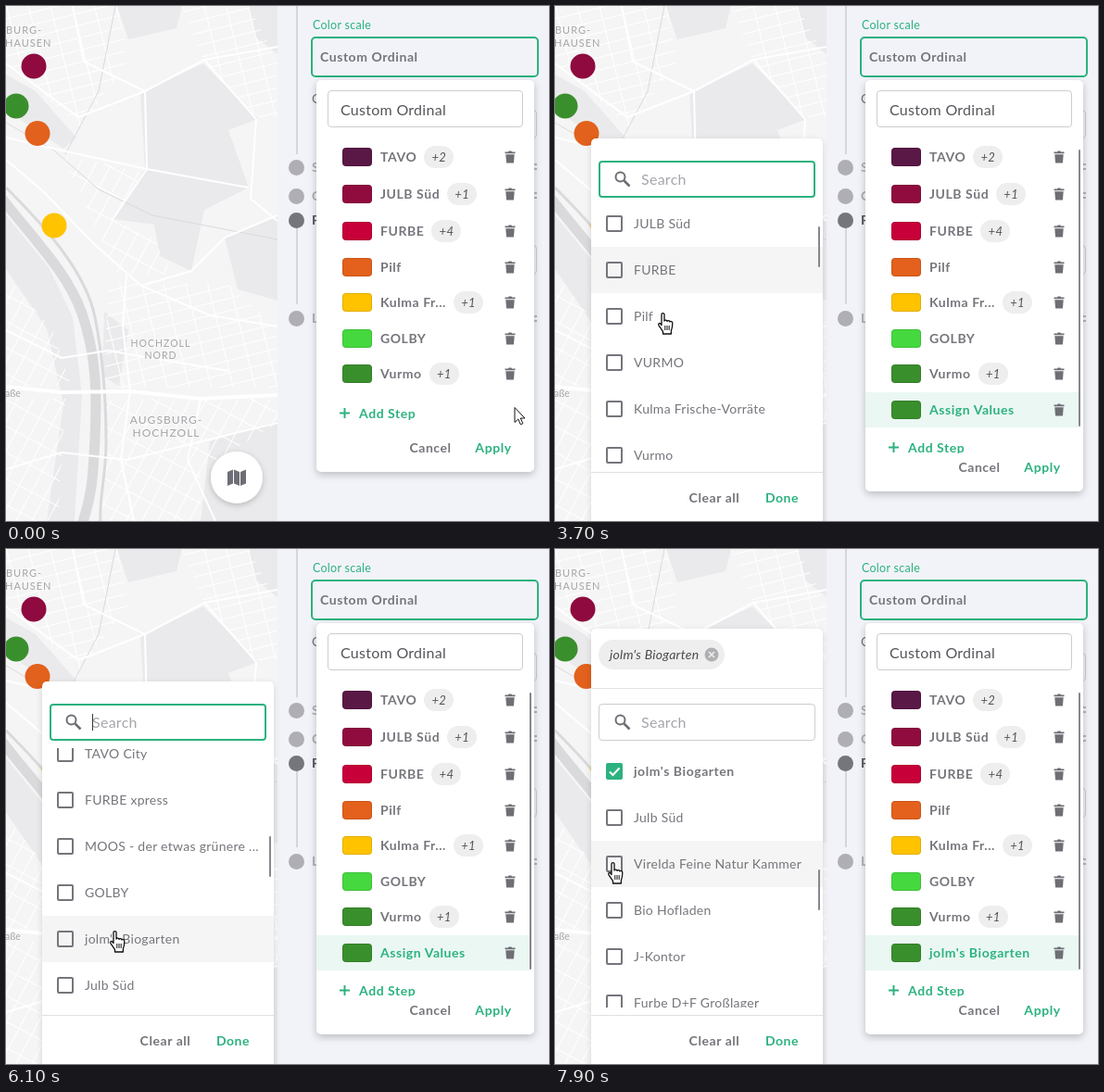
An HTML page that plays this animation: 586x556 px, repeating every 8000 ms.

```html
<!DOCTYPE html>
<html lang="en">
<head>
<meta charset="utf-8">
<title>Custom color scale</title>
<style>
  html, body { margin: 0; width: 100%; height: 100%; overflow: hidden; }
  body { --green: #2cb27f; --gray: #75757c; background: #f2f3f9; color: var(--gray);
    font: 14px/20px Lato, "Open Sans", sans-serif; letter-spacing: .02em; }
  #stage { position: relative; width: 586px; height: 556px; overflow: hidden; }
  #stage div, #stage svg { position: absolute; box-sizing: border-box; white-space: nowrap; }
  b { font-weight: 700; letter-spacing: .04em; }
  .green { color: var(--green); }
  .mid { transform: translate(-50%, -50%); }
  .side { left: 330px; font-weight: 700; margin-top: -10px; color: #aeaeb4; }

  #card { left: 335px; top: 80px; width: 235px; height: 423px; background: #fff;
    border-radius: 5px; box-shadow: 0 3px 9px #0000003a; }
  #card.added { height: 444px; }
  #name { left: 12px; top: 11px; width: 211px; height: 40px; padding-left: 13px;
    border: 1px solid #cdcdd1; border-radius: 4px; font-size: 16px; line-height: 39px; color: #55555b; }
  #steps { left: 0; top: 55px; width: 235px; height: 348px; overflow: hidden; }
  .step { left: 0; width: 230px; height: 38px; display: flex; align-items: center; padding-left: 69px; }
  .swatch { left: 28px; top: 9px; width: 32px; height: 20px; border-radius: 4px; border: 1px solid #0000001c; }
  .count { margin-left: 8px; width: 32px; height: 24px; border-radius: 12px; background: #eee;
    text-align: center; font: italic 13px/24px Lato, "Open Sans", sans-serif; color: #55555b; }
  .trash { left: 203px; top: 12px; fill: #6e6e75; }
  .grip { left: 9px; top: 12px; fill: #75757c; }
  #add { left: 16px; top: 291px; width: 102px; height: 28px; overflow: hidden; border-radius: 4px; }
  .added #add { top: 328px; }
  #add b { position: absolute; left: 30px; top: 4px; }
  #thumb { left: 230px; top: 75px; width: 2px; height: 299px; background: #86868d; border-radius: 1px; }
  .act { top: 397px; }
  .added .act { top: 418px; }
  .ripple { border-radius: 50%; }

  #menu { left: 39px; top: 143px; width: 250px; height: 440px; background: #fff; border-radius: 5px;
    box-shadow: 0 2px 7px #00000024; }
  #menu.picked { top: 86px; height: 497px; }
  #body { left: 0; top: 0; width: 250px; height: 413px; }
  .picked #body { top: 57px; }
  #chip { left: 8px; top: 12px; height: 32px; padding: 0 28px 0 12px; border-radius: 16px;
    background: #eee; font-style: italic; line-height: 32px; color: #4a4a50; }
  #chip svg { right: 6px; top: 8px; }
  #search { left: 8px; top: 24px; width: 234px; height: 40px; border: 2px solid var(--green); border-radius: 4px; }
  .picked #search { border: 1px solid #cdcdd1; }
  #hint { left: 54px; top: 34px; font-size: 16px; color: #a5a5aa; }
  #caret { left: 54px; top: 35px; width: 1px; height: 18px; background: #333; }
  #list { left: 0; top: 72px; width: 250px; height: 280px; overflow: hidden; }
  .item { left: 0; width: 250px; height: 50px; padding-left: 46px; line-height: 50px; overflow: hidden; }
  .item.over { background: #f5f5f5; }
  .box { left: 16px; top: 16px; width: 18px; height: 18px; border: 2px solid var(--gray); border-radius: 2px; }
  .box svg { display: none; left: -2px; top: -2px; }
  .item.on { font-weight: 700; letter-spacing: .04em; }
  .on .box { background: var(--green); border-color: var(--green); }
  .on .box svg { display: block; }
  #bar { left: 245px; width: 2px; height: 44px; background: #86868d; border-radius: 1px; }
</style>
</head>
<body>
<div id="stage">
  <svg width="586" height="556" viewBox="0 0 586 556">
    <defs>
      <pattern id="gridA" width="23" height="13" patternUnits="userSpaceOnUse" patternTransform="rotate(-14)">
        <path d="M0 .5H23M.5 0V13" stroke="#fff" fill="none"/>
      </pattern>
      <pattern id="gridB" width="15" height="25" patternUnits="userSpaceOnUse" patternTransform="rotate(28)">
        <path d="M0 .5H15M.5 0V25" stroke="#fff" fill="none"/>
      </pattern>
      <filter id="soft" x="-30%" y="-30%" width="160%" height="160%">
        <feDropShadow dx="0" dy="2" stdDeviation="3" flood-opacity=".22"/>
      </filter>
    </defs>
    <path fill="#f5f5f6" d="M0 0H293V556H0Z"/>
    <g fill="#eaeaec">
      <path d="M145 94 213 62 272 122 240 134 262 196 214 220 200 286 166 270 160 236 116 230 150 176Z"/>
      <path d="M0 74 32 92 76 142 62 154 0 112ZM120 0H190L184 24 132 36ZM262 0H293V52L270 34Z"/>
      <path d="M0 226 46 282 72 336 82 420 74 556H44L62 430 44 348 0 284ZM106 330 132 350 122 410 104 400Z"/>
      <path d="M236 250 293 226V318L250 306ZM220 470 293 448V556H210Z"/>
    </g>
    <path fill="url(#gridA)" d="M0 0H120L132 60 80 130 0 60ZM110 300 240 300 293 350V412H106ZM190 0H262L293 60V120H268L214 60Z"/>
    <path fill="url(#gridB)" d="M0 290 50 350 70 410H0ZM0 424H64L56 556H0ZM106 424H293V450L210 500V556H104ZM60 160 150 180 116 230 160 250 180 290H120Z"/>
    <g fill="none" stroke="#dadadc">
      <path stroke-width="11" d="M-4 208C26 248 66 286 82 332S98 420 96 466 92 530 82 560"/>
      <path stroke-width="3" d="M0 196C40 236 86 286 96 336S108 430 108 470 100 530 102 560"/>
      <path d="M0 126 52 156 100 198 158 226 293 252M118 0 100 92 64 160"/>
    </g>
    <g fill="none" stroke="#fff" stroke-width="2">
      <path d="M0 166 40 200 94 256 146 302 220 334 293 346M0 62 78 120 150 92 214 58 293 44M214 58 270 122 264 208 293 232"/>
      <path d="M72 0 84 60 150 92 152 176 114 232M0 142 60 156 152 176 262 196M130 290 126 346 134 416 124 490 138 556"/>
      <path stroke-width="4" d="M0 411 60 417 134 416 210 424 293 420"/>
      <path d="M210 424 196 490 226 556M146 302 200 286 236 250 293 226M0 350 60 380 110 372 240 394M0 500 60 482 130 490 293 450"/>
    </g>
    <g font-family="Lato, 'Open Sans', sans-serif" font-size="11" fill="#a4a4a8" letter-spacing="1"
       stroke="#f8f8f8" stroke-width="2" paint-order="stroke">
      <text x="0" y="30">BURG-</text><text x="-1" y="44">HAUSEN</text>
      <g text-anchor="middle">
        <text x="167" y="368" font-size="10.5">HOCHZOLL</text><text x="167" y="381" font-size="10.5">NORD</text>
        <text x="173" y="451" font-size="12">AUGSBURG-</text><text x="173" y="465" font-size="12">HOCHZOLL</text>
      </g>
      <text x="-1" y="422" font-size="10.5" letter-spacing="0">aße</text>
    </g>
    <circle cx="30" cy="65" r="13.5" fill="#8e0a3f"/>
    <circle cx="11" cy="108" r="13.5" fill="#3a8f2d"/>
    <circle cx="34" cy="137.500" r="13.5" fill="#e2611d"/>
    <circle cx="52" cy="237" r="13.5" fill="#ffc300"/>
    <circle cx="249" cy="509" r="28" fill="#fff" filter="url(#soft)"/>
    <path fill="#6e6e76" d="M239 503 245 500.500V515.500L239 518ZM246 500.500 252 503V518L246 515.500ZM253 503 259 500.500V515.500L253 518Z"/>

    <path stroke="#d5d5dc" stroke-width="2" d="M314 0V160M314 236V322"/>
    <g fill="#aeaeb4">
      <circle cx="313.500" cy="174.500" r="8.500"/><circle cx="313.500" cy="205.500" r="8.500"/>
      <circle cx="313.500" cy="231.500" r="8.500" fill="#75757c"/><circle cx="313.500" cy="337.500" r="8.500"/>
    </g>
    <path stroke="#b4b4ba" stroke-width="2" stroke-dasharray="3 1" d="M566 171H574M566 176H574M566 202H574M566 207H574M566 335H574M566 340H574"/>
    <path fill="none" stroke="#cdcdd3" d="M560 112.500H569Q572.500 112.500 572.500 116V138Q572.500 142.500 569 142.500H560M560 258.500H569Q572.500 258.500 572.500 262V285Q572.500 289.500 569 289.500H560"/>
  </svg>

  <div class="side" style="top:100px;font-weight:400;color:#75757c">C</div>
  <div class="side" style="top:174px">S</div>
  <div class="side" style="top:205px">C</div>
  <div class="side" style="top:231px;color:#55555b">F</div>
  <div class="side" style="top:337px">L</div>
  <div class="green" style="left:331px;top:11px;font-size:12.500px">Color scale</div>
  <div style="left:329px;top:33px;width:246px;height:44px;border:2px solid var(--green);border-radius:5px;padding-left:8px;line-height:40px"><b>Custom Ordinal</b></div>

  <div id="card">
    <div id="name">Custom Ordinal</div>
    <div id="steps">
      <div id="add">
        <div class="ripple" id="addRipple" style="background:var(--green)"></div>
        <svg width="13" height="13" style="left:8px;top:7px"><path d="M6.500 1V12M1 6.500H12" stroke="#2cb27f" stroke-width="2"/></svg>
        <b class="green">Add Step</b>
      </div>
    </div>
    <div id="thumb"></div>
    <div class="act mid" style="left:123px"><b>Cancel</b></div>
    <div class="act mid green" style="left:191px"><b>Apply</b></div>
  </div>

  <div id="menu">
    <div id="chip">
      <span></span>
      <svg width="16" height="16"><circle cx="8" cy="8" r="7.500" fill="#b0b0b3"/><path d="M5 5 11 11M11 5 5 11" stroke="#eee" stroke-width="1.600"/></svg>
    </div>
    <div id="rule" style="left:0;top:64px;width:250px;height:1px;background:#e3e3e6"></div>
    <div id="body">
      <div id="search"></div>
      <svg width="18" height="18" style="left:25px;top:35px" fill="none" stroke="#6e6e75" stroke-width="2"><circle cx="6.500" cy="6.500" r="5"/><path d="M10.500 10.500 16.500 16.500" stroke-width="2.600"/></svg>
      <div id="hint">Search</div>
      <div id="caret"></div>
      <div id="list"></div>
      <div id="bar"></div>
      <div style="left:0;top:360px;width:250px;height:1px;background:#e0e0e3"></div>
      <div class="mid" style="left:133px;top:388px"><b>Clear all</b></div>
      <div class="mid green" style="left:206px;top:388px"><b>Done</b></div>
    </div>
  </div>

  <svg id="cursor" width="30" height="30" style="left:-6px;top:0;overflow:visible" fill="#fff" stroke="#111" stroke-linejoin="round">
    <path id="arrow" d="M6 .5V16.500L9.800 13 12.300 18.800 14.800 17.700 12.300 12H17Z"/>
    <g id="hand">
      <path stroke-width="1.300" d="M4 2C4 .2 7 .2 7 2V9C7.400 7.700 9.800 7.800 10 9.300 10.600 8.300 12.600 8.500 12.800 9.900 13.600 9.100 15.800 9.600 15.800 11.200 15.800 15.500 15.800 16.500 14.400 19.500V23H5.500V20.500C4 18.500 2.600 16 .9 13.600 0 12 1.700 10.800 2.900 12L4 13.500Z"/>
      <path d="M7.800 14V19M10 14V19M12.200 14V19"/>
    </g>
  </svg>
</div>

<script>
const $ = id => document.getElementById(id);
const LOOP = 8000, ADDED = 1500, ASSIGN = 2560, OPEN = 2660, PICK = 6250;
const PICKED = 12, SHOP = "jolm's Biogarten";

const steps = [
  ["TAVO", "#5a1846", 163, 2], ["JULB Süd", "#900c3f", 203, 1], ["FURBE", "#c70039", 243, 4],
  ["Pilf", "#e3611c", 282], ["Kulma Fr...", "#ffc300", 320, 1], ["GOLBY", "#45d93f", 359],
  ["Vurmo", "#3a8f2d", 397, 1], ["Assign Values", "#3a8f2d", 436]
];
const shops = ["TAVO", "JULB Süd", "FURBE", "Pilf", "VURMO", "Kulma Frische-Vorräte", "Vurmo", "Vurmo Markt",
  "TAVO City", "FURBE xpress", "MOOS - der etwas grünere ...", "GOLBY", SHOP, "Julb Süd",
  "Virelda Feine Natur Kammer", "Bio Hofladen", "J-Kontor", "Furbe D+F Großlager", "Dorfladen"];

const trash = `<svg class="trash" width="12" height="14"><path d="M.500 1.500H4L4.600.500H7.400L8 1.500H11.500V3.200H.500ZM1.300 4.200H10.700L10 13Q10 13.500 9.200 13.500H2.800Q2 13.500 2 13Z"/></svg>`;
const dots = [2, 7, 12].map(y => `<circle cx="2" cy="${y}" r="1.600"/><circle cx="7" cy="${y}" r="1.600"/>`).join("");
const grip = `<svg class="grip" width="10" height="14">${dots}</svg>`;
const check = `<svg width="18" height="18"><path d="M4 9.500 7.500 13 14.500 5.500" fill="none" stroke="#fff" stroke-width="2"/></svg>`;

function append(parent, cls, top, html) {
  const el = document.createElement("div");
  el.className = cls;
  el.style.top = top + "px";
  el.innerHTML = html;
  return parent.appendChild(el);
}

const stepRows = steps.map(([name, color, y, more]) => append($("steps"), "step", y - 154,
  `<div class="swatch" style="background:${color}"></div><b>${name}</b>` +
  (more ? `<div class="count" style="position:static">+${more}</div>` : "") + trash));
const newRow = stepRows[7];
newRow.insertAdjacentHTML("beforeend", grip);
const newName = newRow.querySelector("b"), newGrip = newRow.querySelector(".grip");

const items = shops.map(name => append($("list"), "item", 0,
  `<div class="box">${check}</div><span style="position:relative">${name}</span>`));
const pickRipple = document.createElement("div");
pickRipple.className = "ripple";
pickRipple.style.background = "#000";
items[PICKED].prepend(pickRipple);
$("chip").querySelector("span").textContent = SHOP;

const clamp = x => Math.min(1, Math.max(0, x));
const ease = x => (x = clamp(x), x * x * (3 - 2 * x));

// Eased value between [time, value] stops
function along(stops, t, k = 1) {
  let i = 0;
  while (i < stops.length - 2 && t >= stops[i + 1][0]) i++;
  const a = stops[i], b = stops[i + 1];
  return a[k] + (b[k] - a[k]) * ease((t - a[0]) / (b[0] - a[0]));
}

const path = [[0, 549, 433], [1200, 433, 441], [2750, 433, 441], [3400, 117, 331], [5450, 117, 331],
  [6000, 118, 412], [6300, 118, 412], [6600, 158, 361], [7350, 158, 361], [7800, 63, 338]];
const wheel = [[3600, 0], [3700, 55], [3900, 110], [4200, 110], [4600, 230], [4800, 240],
  [5200, 419], [6249, 419], [PICK, 420], [6800, 420], [7400, 600]];

function show(el, on) { el.style.visibility = on ? "inherit" : "hidden"; }

function ripple(el, x, y, r, alpha) {
  el.style.cssText += `;left:${x - r}px;top:${y - r}px;width:${2 * r}px;height:${2 * r}px;opacity:${alpha}`;
}

function draw(t) {
  const x = along(path, t, 1), y = along(path, t, 2);
  const hand = x < 290 || (x >= 335 && x < 453);
  $("cursor").style.transform = `translate(${x}px,${y}px)`;
  show($("hand"), hand);
  show($("arrow"), !hand);

  const added = t >= ADDED, assigned = t >= ASSIGN, picked = t >= PICK, onCard = x > 335;
  $("card").classList.toggle("added", added);
  show($("thumb"), added);
  show(newRow, added);
  newRow.style.background = assigned ? (onCard ? "#e2f3eb" : "#eaf7f2") : "#f5f5f5";
  newName.className = assigned ? "green" : "";
  newName.textContent = picked ? SHOP : "Assign Values";
  newGrip.style.opacity = onCard ? ease((t - 1550) / 350) : 0;
  $("add").style.background = hand && t < 1750 ? "#f4f8f6" : "none";
  ripple($("addRipple"), 82, 14, 90 * ease((t - 1350) / 600), .2 * (1 - ease((t - 1650) / 350)));

  $("menu").style.opacity = ease((t - OPEN) / 240);
  $("menu").classList.toggle("picked", picked);
  show($("chip"), picked);
  show($("rule"), picked);
  show($("caret"), !picked && (t < 3000 || t % 1000 < 500));

  const scroll = along(wheel, t);
  // Hover trails the scroll a little
  const over = t > 2900 && x < 289 ? Math.floor((y - 215 + along(wheel, t - 100)) / 50) : -1;
  items.forEach((el, i) => {
    el.style.top = i * 50 - scroll + "px";
    el.classList.toggle("over", i === over);
    el.classList.toggle("on", picked && i === PICKED);
  });
  ripple(pickRipple, 79, 25, 185 * ease((t - 6200) / 550), .12 * (1 - ease((t - 6650) / 350)));
  $("bar").style.top = 84 + .198 * scroll + "px";
}

const start = performance.now();
function tick() {
  draw((performance.now() - start) % LOOP);
  requestAnimationFrame(tick);
}
tick();
</script>
</body>
</html>
```
